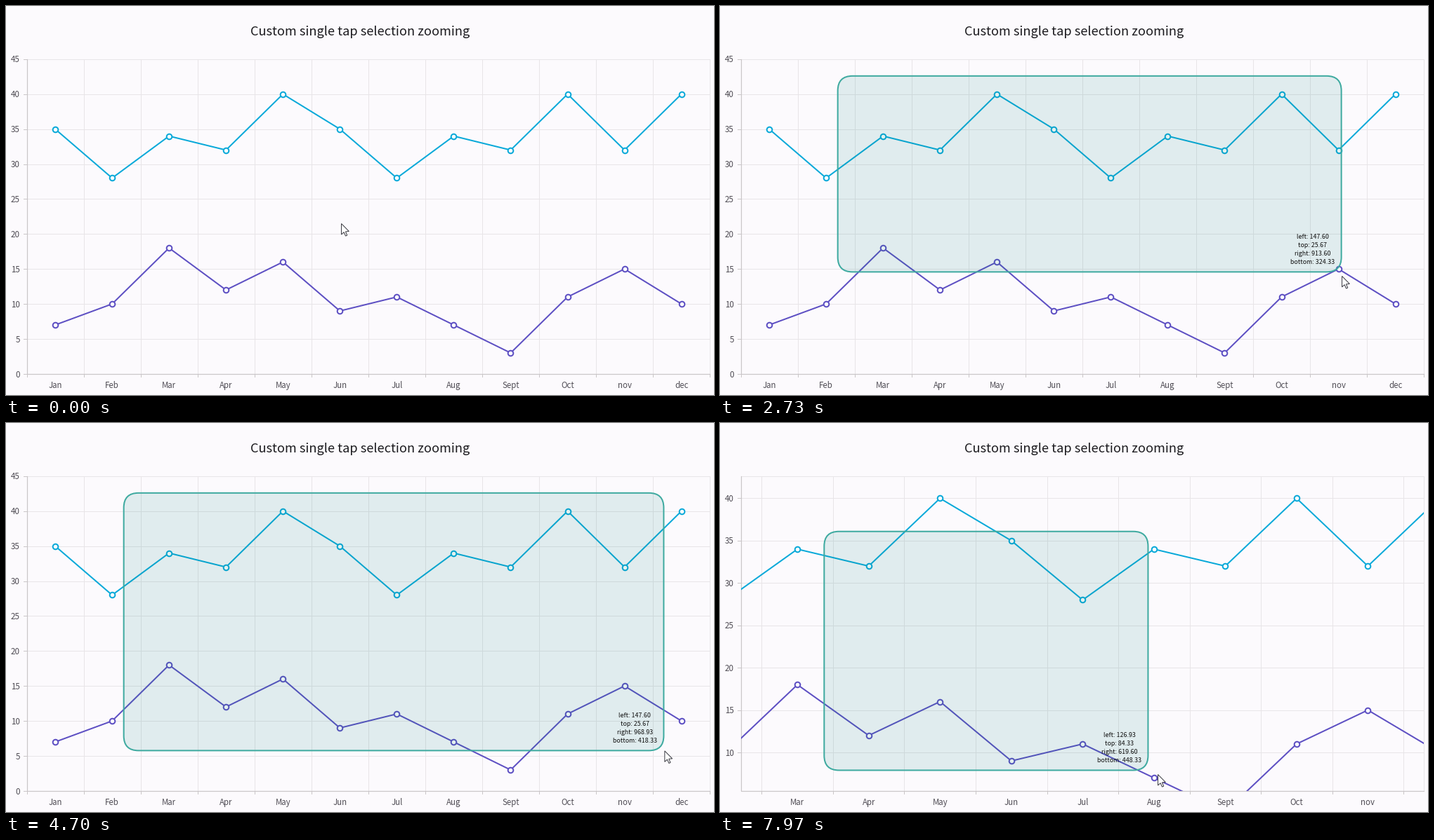
Recreate the animation shown at these times as a matplotlib script. Size 1008 px wide and 555 px high, loop 8 s.

```python
import matplotlib.pyplot as plt
import numpy as np
from matplotlib.animation import FuncAnimation
from matplotlib.patches import FancyBboxPatch, Polygon, Rectangle

W, H, DPI = 1008, 555, 100
LEFT, RIGHT, TOP, BOTTOM = 29.5, 1002.2, 75.8, 524.9
STEP, LOOP = 40, 8000
PX = 72 / DPI

BACK, GRID, AXIS = "#fcfafd", "#e8e5e8", "#cac6c8"
INK, LABEL = "#1c1b1f", "#504d55"
MONTHS = "Jan Feb Mar Apr May Jun Jul Aug Sept Oct nov dec".split()
SERIES = [
    ("#08a9d9", [35, 28, 34, 32, 40, 35, 28, 34, 32, 40, 32, 40]),
    ("#5d4fc3", [7, 10, 18, 12, 16, 9, 11, 7, 3, 11, 15, 10]),
]

# Visible ranges: first and last category, lowest and highest value
FULL = (0, 12, 0, 45)
ZOOM = (1.705, 11.286, 5.46, 42.62)
ZOOM_TIME = 5200
DRAGS = [(1530, ZOOM_TIME), (6870, LOOP)]
LAG = 45                # the selection trails the pointer, in ms


def project(view, category, value):
    """Pixel position of a chart point within a visible range."""
    x0, x1, y0, y1 = view
    x = LEFT + (np.asarray(category) - x0) / (x1 - x0) * (RIGHT - LEFT)
    y = BOTTOM - (np.asarray(value) - y0) / (y1 - y0) * (BOTTOM - TOP)
    return x, y


# Pointer moves: start, end, destination; it rests in between
REST = (477.5, 310.5)
MOVES = [
    (30, 300, (440, 291)),
    (600, 1400, project(FULL, ZOOM[0], ZOOM[3])),
    (1530, 2170, (387.5, 309.5)),
    (2170, 2330, (880, 340)),
    (2330, 3270, (893.5, 450.5)),
    (3270, 4970, project(FULL, ZOOM[1], ZOOM[2])),
    (5300, 5970, (226.5, 261.5)),
    (5970, 6400, (148.3, 154.7)),
    (6870, 7170, (254.5, 332.5)),
    (7170, 7970, (623.5, 501.5)),
]
ARROW = np.array([(0, 0), (0, 15.5), (3.6, 12.2), (6, 17.6),
                  (8.2, 16.6), (5.9, 11.4), (10.8, 11)])

plt.rcParams["font.family"] = ["Noto Sans CJK JP", "DejaVu Sans"]
fig = plt.figure(figsize=(W / DPI, H / DPI), dpi=DPI, facecolor=BACK)
ax = fig.add_axes([0, 0, 1, 1])
ax.set_xlim(0, W)
ax.set_ylim(H, 0)
ax.axis("off")


def line(xs, ys, color, width, z):
    return ax.plot(xs, ys, color=color, lw=width * PX, zorder=z)[0]


def label(x, y, text, size, color, ha="center", z=5):
    return ax.text(x, y, text, fontsize=size * PX, color=color,
                   ha=ha, va="baseline", zorder=z)


def build_chart(view):
    """Draw the chart for one visible range and return its artists."""
    x0, x1, y0, y1 = view
    parts = [line([LEFT, RIGHT, RIGHT], [TOP, TOP, BOTTOM], GRID, 1, 1)]
    for i in range(13):
        if x0 <= i <= x1:
            x, _ = project(view, i, y0)
            parts.append(line([x, x], [TOP, BOTTOM], GRID, 1, 1))
            parts.append(line([x, x], [BOTTOM, BOTTOM + 4.5], AXIS, 1, 2))
    for v in range(0, 50, 5):
        if y0 <= v <= y1:
            _, y = project(view, x0, v)
            parts.append(line([LEFT, RIGHT], [y, y], GRID, 1, 1))
            parts.append(line([LEFT - 5, LEFT], [y, y], AXIS, 1, 2))
            parts.append(label(20, y + 4.6, str(v), 11.6, LABEL, "right"))
    for i, month in enumerate(MONTHS):
        if x0 <= i + 0.5 <= x1:
            x, _ = project(view, i + 0.5, y0)
            parts.append(label(x, 545, month, 11.5, LABEL))

    clip = Rectangle((LEFT, TOP), RIGHT - LEFT, BOTTOM - TOP,
                     transform=ax.transData)
    for color, values in SERIES:
        xs, ys = project(view, np.arange(12) + 0.5, values)
        curve = line(xs, ys, color, 2, 3)
        dots = ax.plot(xs, ys, "o", ms=7.6 * PX, mfc="white", mec=color,
                       mew=2 * PX, zorder=4)[0]
        for part in (curve, dots):
            part.set_clip_path(clip)
        parts += [curve, dots]
    return parts


full_view, zoom_view = build_chart(FULL), build_chart(ZOOM)
line([LEFT, LEFT, RIGHT], [TOP, BOTTOM, BOTTOM], AXIS, 1.2, 2)
label(W / 2, 41.9, "Custom single tap selection zooming", 18.2, INK)

box = FancyBboxPatch((0, 0), 1, 1, boxstyle="round,pad=0,rounding_size=0",
                     fc=(0, 0.5, 0.46, 0.11), ec="#3eaaa0", lw=2 * PX, zorder=6)
ax.add_patch(box)
readout = label(0, 0, "", 8.85, "#111111", z=7)
readout.set(va="bottom", multialignment="center", visible=False)
rows = [label(0, 0, "", 8.85, "#111111", z=7) for _ in range(4)]
pointer = Polygon(ARROW, closed=True, fc="white", ec="#3c3c44",
                  lw=1 * PX, zorder=9)
ax.add_patch(pointer)


def ease(u):
    """Mostly linear, softened at both ends."""
    u = np.clip(u, 0, 1)
    return 0.6 * u + 0.4 * u * u * (3 - 2 * u)


def pointer_at(t):
    place = np.array(REST)
    for start, end, goal in MOVES:
        place = place + (np.array(goal) - place) * ease((t - start) / (end - start))
    return place


# The label counts in units of its own, in steps of two thirds
UNIT, GRAIN = 0.936, 2 / 3
CORNER, PHASE = np.array([LEFT, TOP]), np.array([0.264, 0.333])


def to_units(point):
    raw = (point - CORNER) / UNIT
    return np.round((raw - PHASE) / GRAIN) * GRAIN + PHASE


def show_selection(t):
    start = next((a for a, b in DRAGS if a <= t < b), None)
    for part in (box, *rows):
        part.set_visible(False)
    if start is None:
        return
    first = to_units(pointer_at(start))
    last = to_units(pointer_at(max(start, t - LAG)))
    width, height = (last - first) * UNIT
    if min(width, height) < 2:
        return
    x, y = first * UNIT + CORNER
    radius = min(21, width / 2, height / 2)
    box.set_boxstyle("round", pad=0, rounding_size=radius)
    box.set_bounds(x, y, width, height)
    box.set_visible(True)
    if width < 74 or height < 58:
        return
    names = ("left", "top", "right", "bottom")
    for i, (row, name, value) in enumerate(zip(rows, names, (*first, *last))):
        row.set_text(f"{name}: {value:.2f}")
        row.set_position((x + width - 41, y + height - 47.6 + 12.2 * i))
        row.set_visible(True)


def draw(n):
    t = n * STEP + STEP / 4
    zoomed = t >= ZOOM_TIME
    for part in full_view:
        part.set_visible(not zoomed)
    for part in zoom_view:
        part.set_visible(zoomed)
    show_selection(t)
    pointer.set_xy(ARROW + pointer_at(t))
    return []


readout.remove()
anim = FuncAnimation(fig, draw, frames=LOOP // STEP, interval=STEP,
                     init_func=lambda: draw(0), repeat=True, repeat_delay=0)
plt.show()
```
